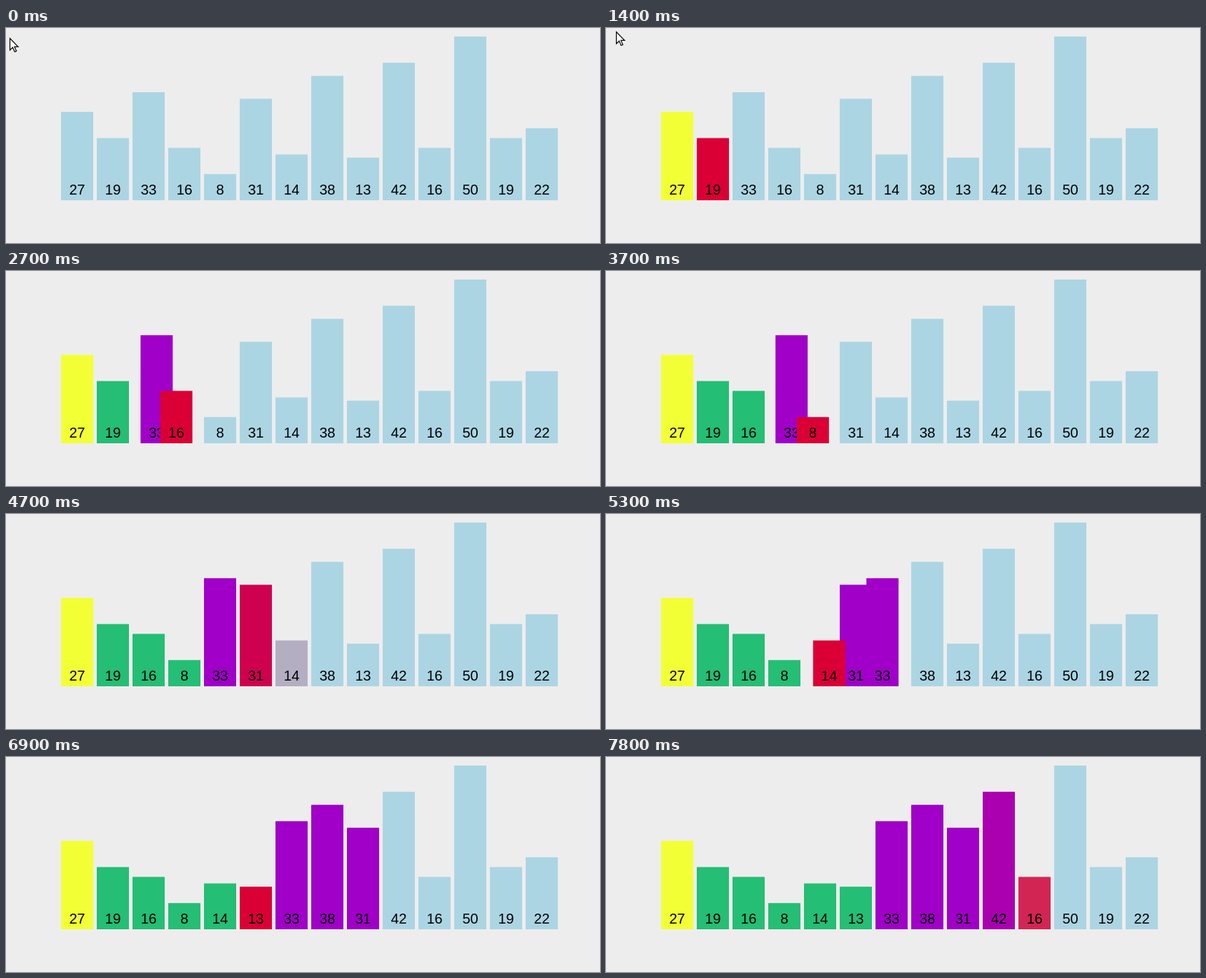
An HTML page with a canvas that plays this animation: 831 by 302 pixels, repeating every 8000 ms.

```html
<!DOCTYPE html>
<html lang="en">
<head>
<meta charset="utf-8">
<title>Quick sort partition</title>
<style>
  html, body { margin: 0; width: 100%; height: 100%; overflow: hidden; background: #ededed; }
  canvas { display: block; }
</style>
</head>
<body>
<canvas id="stage" width="831" height="302"></canvas>
<script>
const ctx = document.getElementById('stage').getContext('2d');

const VALUES = [27, 19, 33, 16, 8, 31, 14, 38, 13, 42, 16, 50, 19, 22];
const BLUE = [172, 213, 227], YELLOW = [243, 255, 53], RED = [218, 0, 53],
      GREEN = [36, 190, 116], PURPLE = [160, 0, 200];

const LOOP = 8000, TICK = 100;
const STEP_START = 577, STEP_GAP = 502, STEP_LENGTH = 300;
const SKIPPED_TICKS = [900, 3400, 4900, 5900, 7900];

// Each step recolours or swaps bars, named by their starting index.
const paint = (...pairs) => ({ paint: pairs });
const swap = (a, b) => ({ swap: [a, b] });
const STEPS = [
  paint([0, YELLOW]),
  paint([1, RED]),
  paint([1, GREEN], [2, RED]),
  paint([2, PURPLE], [3, RED]),
  swap(2, 3),
  paint([3, GREEN], [4, RED]),
  swap(2, 4),
  paint([4, GREEN], [5, RED]),
  paint([5, PURPLE], [6, RED]),
  swap(2, 6),
  paint([6, GREEN], [7, RED]),
  paint([7, PURPLE], [8, RED]),
  swap(5, 8),
  paint([8, GREEN], [9, RED]),
  paint([9, PURPLE], [10, RED])
];

// Pointer position from each time on; it leaves the stage at the end.
const POINTER = [[0, 5, 14], [200, 17, 5], [1300, 14, 5], [1600, 4, 8], [1700, -50, 8]];
const arrow = new Path2D('M.5 .5V17L4.4 13.3L7.2 19.5L9.6 18.4L6.9 12.4H12Z');

const mix = (a, b, p) => a + (b - a) * p;
const cubicInOut = p => p < 0.5 ? 4 * p ** 3 : 1 - 4 * (1 - p) ** 3;

function barsAt(time) {
  const bars = VALUES.map((value, slot) => ({ value, slot, color: BLUE }));
  STEPS.forEach((step, i) => {
    const elapsed = (time - STEP_START - i * STEP_GAP) / STEP_LENGTH;
    if (elapsed <= 0) return;
    const p = cubicInOut(Math.min(1, elapsed));
    if (step.swap) {
      const [a, b] = step.swap.map(index => bars[index]);
      [a.slot, b.slot] = [mix(a.slot, b.slot, p), mix(b.slot, a.slot, p)];
    } else {
      for (const [index, color] of step.paint) {
        bars[index].color = bars[index].color.map((c, k) => mix(c, color[k], p));
      }
    }
  });
  return bars;
}

function drawBar({ value, slot, color }) {
  const x = 77 + slot * 50, height = value * 4.6;
  ctx.fillStyle = `rgb(${color.map(Math.round)})`;
  ctx.fillRect(x, 242 - height, 45, height);
  ctx.fillStyle = '#000';
  ctx.fillText(value, x + 22.5, 234);
}

function drawPointer(time) {
  const [, x, y] = POINTER.filter(([start]) => start <= time).pop();
  ctx.save();
  ctx.translate(x, y);
  ctx.fillStyle = '#fff';
  ctx.strokeStyle = '#000';
  ctx.lineWidth = 1.2;
  ctx.fill(arrow);
  ctx.stroke(arrow);
  ctx.restore();
}

function draw(now) {
  // The picture advances ten times a second, with a few ticks held.
  let time = Math.floor((now % LOOP) / TICK) * TICK;
  if (SKIPPED_TICKS.includes(time)) time -= TICK;

  ctx.fillStyle = '#ededed';
  ctx.fillRect(0, 0, 831, 302);
  ctx.font = '20px "Liberation Sans", Arial, sans-serif';
  ctx.textAlign = 'center';
  barsAt(time).forEach(drawBar);
  drawPointer(time);
}

const begin = performance.now();
function frame() {
  draw(performance.now() - begin);
  requestAnimationFrame(frame);
}
frame();
</script>
</body>
</html>
```
